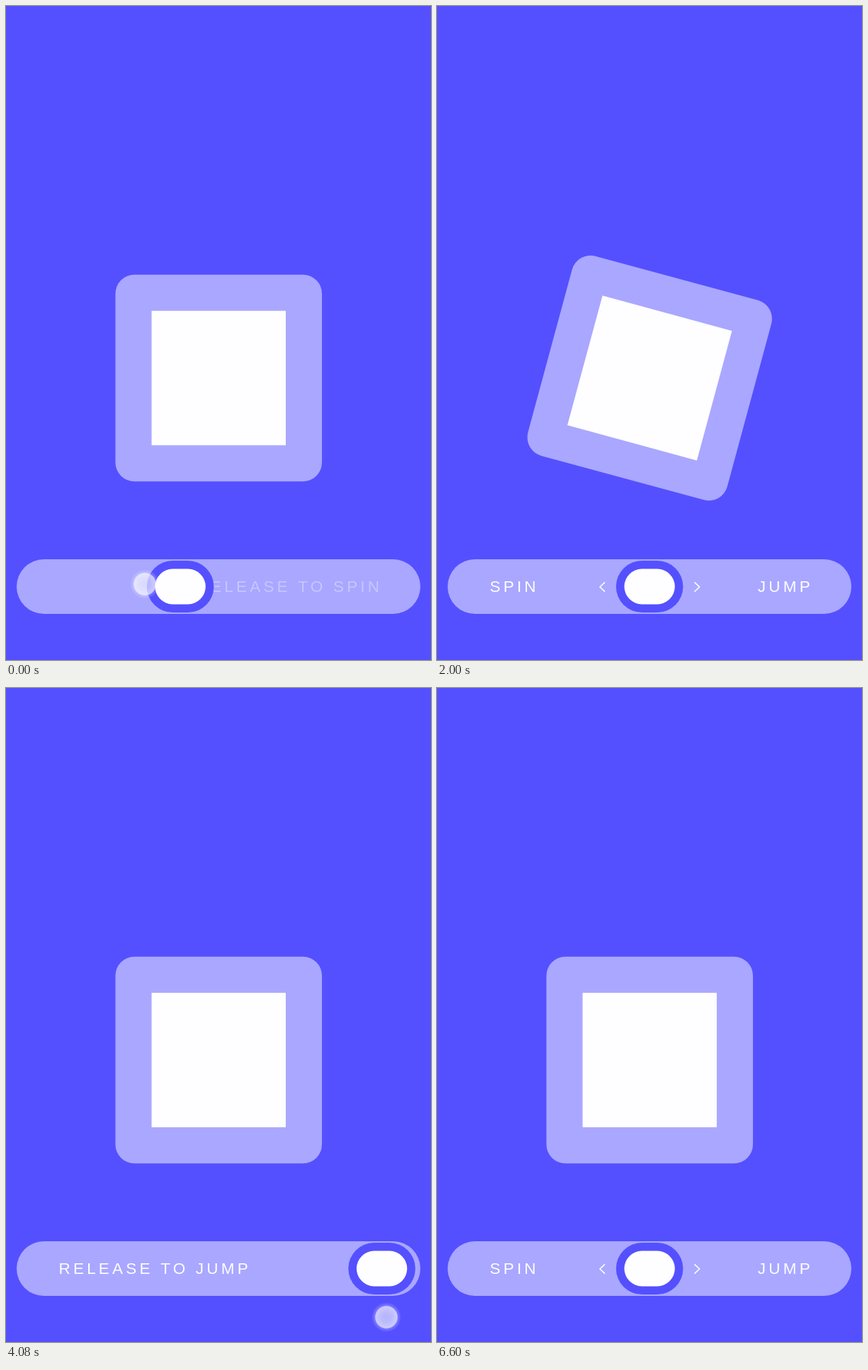
Write an HTML page with a canvas that moves like this. It is 600 px wide and 922 px high and loops after 6680 ms.

```html
<!DOCTYPE html>
<html lang="en">
<head>
<meta charset="utf-8">
<title>Spin or jump</title>
<style>
html, body { margin: 0; width: 100%; height: 100%; overflow: hidden; background: #5450ff; }
canvas { display: block; }
</style>
</head>
<body>
<canvas id="stage" width="600" height="922"></canvas>
<script>
const ctx = document.getElementById('stage').getContext('2d');
const BLUE = '#5450ff', PANEL = '#a9a7ff', WHITE = '#fefdff';
const LOOP = 6680, STEP = 40;
const REACH = 230.5;              // how far the knob can be dragged
const SPIN_AT = 524, JUMP_AT = 4110;
const SNAP = 535, FADE = 280;     // knob return, label fade-in
const RISE = 317, FALL = 1100, HEIGHT = 292;

const clamp = (v, lo = 0, hi = 1) => Math.min(hi, Math.max(lo, v));
const part = (t, start, length) => clamp((t - start) / length);
const mix = (a, b, u) => a + (b - a) * u;

const sineInOut = u => (1 - Math.cos(Math.PI * u)) / 2;
const quadOut = u => 1 - (1 - u) ** 2;
const backOut = u => 1 + 2.7 * (u - 1) ** 3 + 1.7 * (u - 1) ** 2;
function bounceOut(u) {
  const k = 7.5625, d = 2.75;
  if (u < 1 / d) return k * u * u;
  if (u < 2 / d) return k * (u - 1.5 / d) ** 2 + 0.75;
  if (u < 2.5 / d) return k * (u - 2.25 / d) ** 2 + 0.9375;
  return k * (u - 2.625 / d) ** 2 + 0.984375;
}

function pointerAt(t) {
  if (t < 2000) {
    const u = quadOut(part(t, 0, 360));
    return { x: mix(196, 19, u), y: mix(815, 838, u), alpha: 1 - part(t, SPIN_AT, 160) };
  }
  const u = sineInOut(part(t, 3560, 440));
  return {
    x: mix(300, 537, u), y: mix(815, 887, u),
    alpha: part(t, 3460, 120) - part(t, JUMP_AT, 160)
  };
}

function knobAt(t, pointer) {
  if (t < SPIN_AT) return Math.max(-REACH, pointer.x - 250);
  if (t < 3460) return -REACH * (1 - backOut(part(t, SPIN_AT, SNAP)));
  if (t < JUMP_AT) return Math.min(REACH, pointer.x - 300);
  return REACH * (1 - backOut(part(t, JUMP_AT, SNAP)));
}

const labelAlpha = t =>
  part(t, SPIN_AT + SNAP, FADE) - part(t, 3560, 140) + part(t, JUMP_AT + SNAP, FADE);

const spinAt = t => 4 * Math.PI * sineInOut(part(t, SPIN_AT, 2163));

function liftAt(t) {
  const top = JUMP_AT + RISE;
  return t < top
    ? HEIGHT * quadOut(part(t, JUMP_AT, RISE))
    : HEIGHT * (1 - bounceOut(part(t, top, FALL)));
}

function pill(x, y, w, h, r, color) {
  ctx.fillStyle = color;
  ctx.beginPath();
  ctx.roundRect(x, y, w, h, r);
  ctx.fill();
}

function label(text, x, alpha) {
  ctx.globalAlpha = clamp(alpha);
  ctx.fillStyle = WHITE;
  ctx.fillText(text, x, 826.3);
  ctx.globalAlpha = 1;
}

function chevron(x, dir, alpha) {
  ctx.globalAlpha = clamp(alpha);
  ctx.strokeStyle = WHITE;
  ctx.lineWidth = 1.6;
  ctx.beginPath();
  ctx.moveTo(x, 812.3);
  ctx.lineTo(x + 7 * dir, 819);
  ctx.lineTo(x, 825.7);
  ctx.stroke();
  ctx.globalAlpha = 1;
}

function drawSquare(t) {
  ctx.save();
  ctx.translate(300.25, 524.5 - liftAt(t));
  ctx.rotate(spinAt(t));
  pill(-145.8, -145.8, 291.6, 291.6, 27, PANEL);
  pill(-94.7, -94.7, 189.4, 189.4, 0, WHITE);
  ctx.restore();
}

function drawSlider(t, knob) {
  pill(15, 780, 570, 77, 38.5, PANEL);
  ctx.font = '22.5px "Liberation Sans", Arial, sans-serif';
  ctx.letterSpacing = '4.2px';

  const idle = labelAlpha(t);
  label('SPIN', 74.5, idle);
  label('JUMP', 452.8, idle);
  chevron(237, -1, idle);
  chevron(363.5, 1, idle);

  const pull = Math.abs(knob) / 150;
  if (knob < 0) label('RELEASE TO SPIN', 268.6, pull);
  else label('RELEASE TO JUMP', 74.5, pull);

  pill(252.8 + knob, 782, 94.6, 73, 36.5, BLUE);
  pill(264.4 + knob, 793.6, 71.4, 49.8, 24.9, WHITE);
}

function drawPointer({ x, y, alpha }) {
  if (alpha <= 0) return;
  const glow = ctx.createRadialGradient(x, y, 0, x, y, 21);
  const stops = [[0, 0.57], [0.4, 0.62], [0.7, 0.7], [0.73, 0.7], [0.77, 0.25], [1, 0]];
  for (const [at, a] of stops) glow.addColorStop(at, `rgba(255,255,255,${a})`);
  ctx.globalAlpha = alpha;
  pill(x - 21, y - 21, 42, 42, 21, glow);
  ctx.globalAlpha = 1;
}

function draw(now) {
  const t = Math.floor((now % LOOP) / STEP) * STEP;
  const pointer = pointerAt(t);
  ctx.fillStyle = BLUE;
  ctx.fillRect(0, 0, 600, 922);
  drawSquare(t);
  drawSlider(t, knobAt(t, pointer));
  drawPointer(pointer);
}

let begin;
function tick(now) {
  begin ??= now;
  draw(now - begin);
  requestAnimationFrame(tick);
}
draw(0);
requestAnimationFrame(tick);
</script>
</body>
</html>
```
